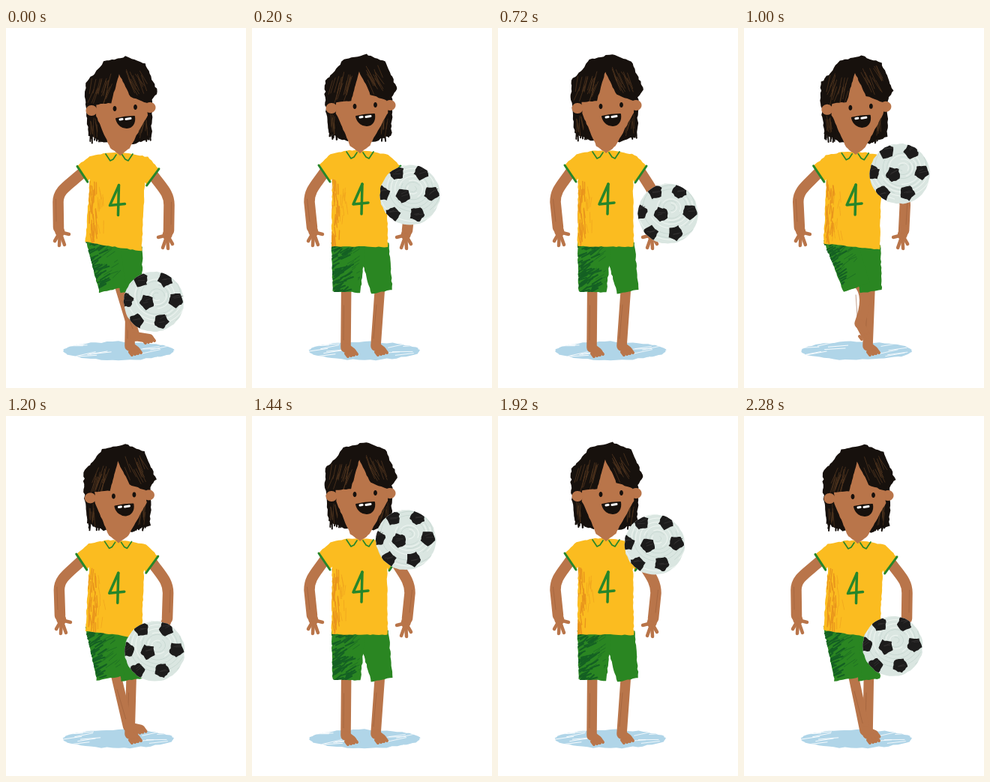
These frames come from a looping animation (320x480 px, 2.32 s). An HTML page with a canvas:

```html
<!DOCTYPE html>
<html lang="en">
<head>
<meta charset="utf-8">
<title>Keepy-uppy</title>
<style>
  html, body { margin: 0; width: 100%; height: 100%; overflow: hidden; background: #fff; }
  canvas { display: block; width: 320px; height: 480px; }
</style>
</head>
<body>
<canvas id="stage" width="320" height="480"></canvas>
<script>
const ctx = document.getElementById('stage').getContext('2d');
const STEP = 40, BEAT = 580, LOOP = BEAT * 4, MID = 143.5;
const SKIN = '#b9754a', SKIN_DARK = '#9a5f3a', GREEN = '#27862a', INK = '#17110d';

// Where the ball meets the foot, how long it rests there and how high it then flies.
const KICKS = [
  { x: 197, y: 365, hold: 0, height: 164 },
  { x: 234, y: 391, hold: 30, height: 216 },
  { x: 197, y: 365, hold: 0, height: 200 },
  { x: 214, y: 365, hold: 0, height: 226 }
];
const SIDE_KICK = 1;

const HALF_SHIRT = [[130, 163], [105, 168], [89, 183], [104, 205], [107, 201], [106, 291]];
const FINGERS = [[-5, 18], [1, 24], [8, 23], [14, 9]];
const HAIR = [98,70, 110,58, 122,42, 152,35, 178,45, 194,82, 187,92, 186,143, 162,152, 123,150, 102,140, 97,92];
const FACE = [143,58, 158,89, 180,97, 181,113, 157,157, 144,167, 131,157, 112,114, 112,99, 132,97];

// Seeded noise gives the crayon edges and strokes.
let seed = 1;
const rnd = () => (seed = seed * 16807 % 2147483647) / 2147483647;
const jit = a => (rnd() * 2 - 1) * a;

const mix = (a, b, k) => a + (b - a) * k;
const clamp = u => Math.max(0, Math.min(1, u));
const ramp = (t, a, b) => { const u = clamp((t - a) / (b - a)); return u * u * (3 - 2 * u); };
const bump = (t, c, w) => ramp(t, c - w, c) - ramp(t, c, c + w);

function poseAt(t) {
  const k = Math.floor((t + 300) / BEAT), d = t - k * BEAT;
  const back = 1 - ramp(d, 0, 140);
  if (k % 4 === SIDE_KICK) {
    const s = ramp(d, -200, 0) * back;
    return { lean: -.35 * ramp(d, -300, -100) * back, wind: 0, a: [125, 426, 0], b: [165 + 31 * s, 424 - 10 * s, s / 2] };
  }
  const rise = ramp(d, -300, -170), hit = ramp(d, -70, 0) * back, wind = bump(d, -160, 130);
  return {
    lean: (.6 * rise + .4 * ramp(d, -170, -60)) * back,
    wind,
    a: [125 + 29 * rise * back + 18 * hit, 426 - 32 * wind - 15 * hit, hit],
    b: [165, 424, 0]
  };
}

function ballAt(t) {
  const i = Math.floor(t / BEAT), p = KICKS[i], q = KICKS[(i + 1) % 4];
  const u = clamp((t - i * BEAT - p.hold) / (BEAT - p.hold - q.hold));
  return [mix(p.x, q.x, u), mix(p.y, q.y, u) - 4 * p.height * u * (1 - u)];
}

function trace(pts, rough = .6) {
  ctx.beginPath();
  for (let i = 0; i < pts.length; i += 2) {
    const x = pts[i], y = pts[i + 1];
    const x2 = pts[(i + 2) % pts.length], y2 = pts[(i + 3) % pts.length];
    const n = Math.ceil(Math.hypot(x2 - x, y2 - y) / 4);
    for (let j = 0; j < n; j++)
      ctx.lineTo(mix(x, x2, j / n) + jit(rough), mix(y, y2, j / n) + jit(rough));
  }
  ctx.closePath();
}

function shape(pts, color, rough) {
  trace(pts, rough);
  ctx.fillStyle = color;
  ctx.fill();
}

function line(pts, color, width) {
  ctx.beginPath();
  for (let i = 0; i < pts.length; i += 2) ctx.lineTo(pts[i], pts[i + 1]);
  ctx.strokeStyle = color;
  ctx.lineWidth = width;
  ctx.stroke();
}

function oval(x, y, rx, ry, color, rough = 0) {
  ctx.beginPath();
  for (let i = 0; i < 60; i++) {
    const a = i * Math.PI / 30;
    ctx.lineTo(x + Math.cos(a) * (rx + jit(rough)), y + Math.sin(a) * (ry + jit(rough)));
  }
  ctx.fillStyle = color;
  ctx.fill();
}

function hatch(n, x, y, w, h, dx, dy, color, width) {
  for (let i = 0; i < n; i++) {
    const px = x + rnd() * w, py = y + rnd() * h;
    line([px, py, px + dx + jit(3), py + dy + jit(3)], color, width);
  }
}

function clipped(draw) {
  ctx.save();
  ctx.clip();
  draw();
  ctx.restore();
}

function shadow() {
  oval(150, 430.5, 74, 12, '#b0d5e8', 1.2);
  clipped(() => {
    hatch(8, 72, 421, 42, 17, 26, -3, '#fff', .9);
    hatch(5, 175, 424, 30, 15, 24, -3, '#fff', .8);
  });
}

// One leg: the hem of the shorts follows the ankle, the knee lies between.
function limb([ax, ay, kick], restHem, restAnkle, shift, wind) {
  const hx = restHem + (ax - restAnkle) * .35 + shift + 14 * wind;
  const hy = 352 - (426 - ay) * .2;
  return { hx, hy, ax, ay, kick, wind };
}

function leg({ hx, hy, ax, ay, kick, wind }) {
  const sx = mix(hx, ax, .3), sy = hy - 6;
  ctx.beginPath();
  ctx.moveTo(sx, sy);
  ctx.quadraticCurveTo((sx + ax) / 2 + 16 * wind, (sy + ay) / 2 - 12 * wind, ax, ay);
  ctx.strokeStyle = SKIN;
  ctx.lineWidth = 13.5;
  ctx.stroke();
  const tx = ax + 8 + 11 * kick, ty = ay + 6 - 3 * kick + 9 * wind;
  line([ax, ay, tx, ty], SKIN, 12);
  for (let i = -1; i < 3; i++)
    line([tx - i * 4, ty + i, tx - i * 4 + 3, ty + i + 4], SKIN, 4);
  line([ax - 3, ay - 10, mix(ax, sx, .7) - 3, mix(ay, sy, .7)], SKIN_DARK, .6);
}

function thigh({ hx, hy }, waistL, waistR, half) {
  const [x, y] = waistL, cx = (x + waistR[0]) / 2;
  const a = Math.atan2(hx - cx, hy - 290), dx = Math.cos(a) * half, dy = Math.sin(a) * half;
  shape([x, y - 4, waistR[0], waistR[1] - 4, hx + dx, hy - dy, hx - dx, hy + dy], '#2a8622');
}

function shorts(a, b, warp) {
  const left = warp(106, 290), mid = warp(MID, 290), right = warp(182, 290);
  thigh(b, [mid[0] - 4, mid[1]], right, 14.5);
  thigh(a, left, [mid[0] + 8, mid[1]], 18.5);
  const [x, y] = left;
  trace([...left, ...mid, a.hx + 18, a.hy, a.hx - 18, a.hy], 0);
  clipped(() => {
    hatch(50, x - 4, y, 24, 64, 10, -6, '#146023', 2);
    hatch(20, x + 12, y, 30, 50, 12, -8, '#1b6b24', .8);
  });
}

function arm(side, lean, warp) {
  const drop = side > 0 ? 4 : 0;
  const [sx, sy] = warp(MID + side * 46, 191);
  const ex = MID + side * (67 + 7 * lean), ey = 228 + drop;
  const wx = MID + side * (63.5 + 10 * lean), wy = 266 + drop;
  ctx.beginPath();
  ctx.moveTo(sx, sy);
  ctx.bezierCurveTo(mix(sx, ex, .6), mix(sy, ey, .5), ex, ey - 12, ex, ey + 4);
  ctx.lineTo(wx, wy);
  ctx.strokeStyle = SKIN;
  ctx.lineWidth = 14.5;
  ctx.stroke();
  const px = wx - side * 2, py = wy + 6;
  line([wx, wy, px, py], SKIN, 13);
  for (const [dx, dy] of FINGERS) line([px, py, wx - side * dx, wy + dy], SKIN, 4.5);
  line([ex + side * 3, ey, wx + side * 3, wy - 8], SKIN_DARK, .6);
}

function shirt(warp) {
  const right = HALF_SHIRT.map(([x, y]) => [2 * MID - x, y + 1]).reverse();
  const pts = [...HALF_SHIRT, ...right].map(p => warp(...p));
  shape(pts.flat(), '#fbbc20');
  trace(pts.flat(), 0);
  clipped(() => {
    const [x, y] = pts[4];
    hatch(30, x - 1, y, 11, 80, 0, 15, '#e9951c', 1.4);
    hatch(10, x + 9, y + 10, 10, 60, 0, 14, '#f0a51d', .8);
  });
  line(pts.slice(2, 4).flat(), GREEN, 3);
  line(pts.slice(8, 10).flat(), GREEN, 3);
}

function badge(warp) {
  const [x, y] = warp(144, 166);
  for (const side of [-1, 1])
    line([x + side * 18, y - 1, x + side * 12, y + 8, x + side * 8, y + 6, x + side * 4, y], GREEN, 1.7);
  const [cx, cy] = warp(145, 228);
  line([cx + 2, cy - 20, cx - 10, cy + 7, cx + 10, cy + 5], GREEN, 3.5);
  line([cx + 2, cy - 20, cx + 1, cy + 20], GREEN, 3.5);
}

function head(lean) {
  ctx.save();
  ctx.translate(8 * lean, 3 * lean);
  shape(HAIR, INK, 1);
  for (const x of [104, 166]) hatch(12, x, 125, 17, 8, 0, 17, INK, 2);
  trace(HAIR, 0);
  clipped(() => {
    hatch(16, 106, 58, 28, 24, -6, 20, '#51351f', .8);
    hatch(13, 150, 48, 24, 22, 9, 18, '#51351f', .8);
    hatch(8, 104, 114, 10, 14, 1, 16, '#51351f', .7);
    hatch(8, 172, 114, 10, 12, -1, 16, '#51351f', .7);
  });
  oval(106, 107, 7.5, 7, SKIN);
  oval(184, 103, 7.5, 7, SKIN);
  shape(FACE, SKIN, .5);
  oval(137, 104.5, 2.4, 3.5, INK);
  oval(164.5, 102.5, 2.4, 3.5, INK);
  ctx.beginPath();
  ctx.moveTo(139, 118);
  ctx.quadraticCurveTo(151, 115, 163, 115);
  ctx.bezierCurveTo(166, 134, 143, 135, 139, 118);
  ctx.fillStyle = ctx.strokeStyle = INK;
  ctx.lineWidth = 2;
  ctx.fill();
  ctx.stroke();
  line([144, 119, 147, 118.5], '#fff', 3);
  line([152, 118.5, 158, 117.5], '#fff', 3);
  ctx.restore();
}

function patch(x, y, turn) {
  const pts = [];
  for (let i = 0; i < 5; i++) {
    const a = i * Math.PI * .4 + turn;
    pts.push(x + Math.cos(a) * 10.5, y + Math.sin(a) * 10.5);
  }
  shape(pts, '#1d1c1c', .7);
  hatch(2, x - 5, y - 4, 4, 6, 8, -3, '#383636', .7);
}

function ball([x, y]) {
  ctx.save();
  ctx.translate(x, y);
  oval(0, 0, 40, 40, '#dae6e1', .6);
  clipped(() => {
    for (let i = 0; i < 16; i++) {
      const a = rnd() * 6.3;
      ctx.beginPath();
      ctx.ellipse(4, -8, 5 + i * 2.7, 4 + i * 2.6, 0, a, a + 3);
      ctx.strokeStyle = i % 2 ? '#f0f6f2' : '#c9d9d3';
      ctx.lineWidth = 1;
      ctx.stroke();
    }
    patch(-9, 1, .5);
    for (let i = 0; i < 6; i++) {
      const a = i * Math.PI / 3, py = Math.sin(a) * 32 - 2;
      patch(Math.cos(a) * 33 - 4 - py * .1, py, a + .3);
    }
  });
  ctx.restore();
}

function draw(t) {
  const { lean, wind, a, b } = poseAt(t);
  // Leaning pushes the shoulders sideways and tips the hem.
  const warp = (x, y) => {
    const h = (290 - y) / 125;
    return [x + 7 * lean * h, y + lean * (3 * h + (x - MID) * .15 * (1 - h))];
  };
  const legA = limb(a, 126, 125, 0, wind);
  const legB = limb(b, 173, 165, -6 * Math.max(0, lean), 0);

  seed = 7919 * (1 + Math.floor(t / (STEP * 3)) % 3) + 17;
  ctx.fillStyle = '#fff';
  ctx.fillRect(0, 0, 320, 480);
  ctx.lineCap = ctx.lineJoin = 'round';
  shadow();
  leg(legB);
  leg(legA);
  shorts(legA, legB, warp);
  for (const side of [-1, 1]) arm(side, lean, warp);
  shirt(warp);
  head(lean);
  badge(warp);
  ball(ballAt(t));
}

const start = performance.now();
function tick() {
  const t = (performance.now() - start) % LOOP;
  draw(Math.floor(t / STEP) * STEP);
  requestAnimationFrame(tick);
}
tick();
</script>
</body>
</html>
```
